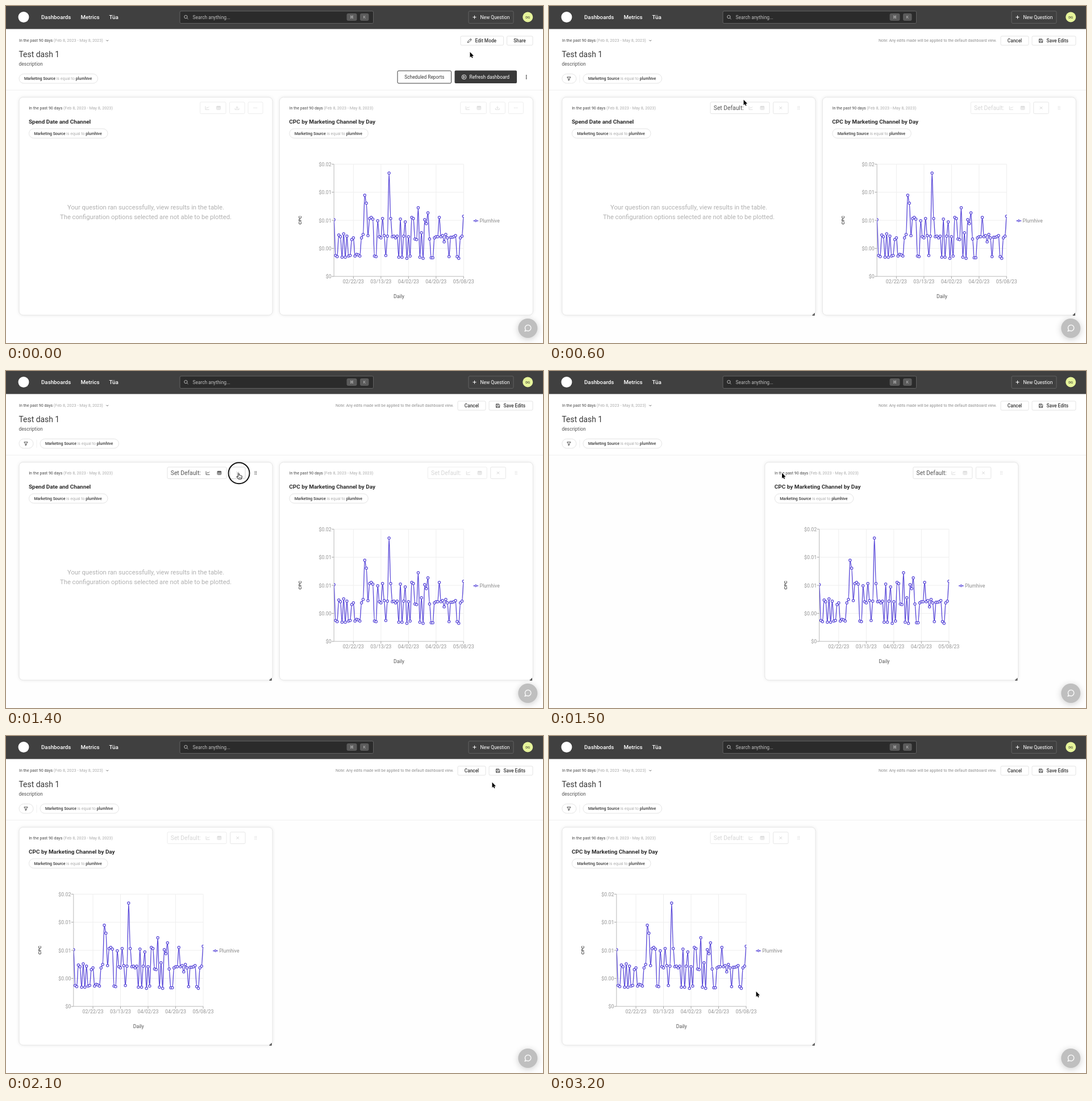
Write an HTML page with a canvas that moves like this. It is 945 px wide and 593 px high and loops after 3.3 s.

```html
<!DOCTYPE html>
<html lang="en">
<head>
<meta charset="utf-8">
<title>Dashboard editing</title>
<style>
html, body { margin: 0; width: 100%; height: 100%; overflow: hidden; background: #fff; }
canvas { display: block; width: 945px; height: 593px; }
</style>
</head>
<body>
<canvas id="stage"></canvas>
<script>
const canvas = document.getElementById('stage');
const ctx = canvas.getContext('2d');
const W = 945, H = 593, LOOP = 3300, STEP = 100;
const ratio = window.devicePixelRatio || 1;
canvas.width = W * ratio;
canvas.height = H * ratio;

const INK = '#383838', MUTED = '#ababab', LINE = '#e4e4e4', PURPLE = '#5847d8';
const SOURCE = 'plumhive';

// CPC per day, as heights on the stage
const daily = [
  376, 439, 441, 403, 406, 442, 401, 442, 405, 440, 439, 411, 408, 440, 437, 438, 440,
  408, 402, 333, 347, 404, 374, 372, 375, 440, 441, 378, 406, 408, 374, 404, 439, 405,
  294, 374, 406, 405, 408, 405, 442, 375, 442, 405, 380, 444, 406, 440, 372, 374, 410,
  411, 355, 442, 399, 444, 376, 383, 364, 410, 443, 443, 408, 406, 406, 372, 406, 404,
  415, 402, 408, 441, 407, 407, 406, 404, 441, 444, 408, 405, 370
];

// Pointer stops: step, x, y
const stops = [
  [0, 816.5, 81], [1, 838, 60], [3, 838, 60], [5, 440, 152], [6, 342.5, 165],
  [9, 395, 176], [12, 410, 179.5], [18, 410, 179.5], [19, 440, 172], [20, 864, 66],
  [21, 855.5, 81.5], [24, 824, 377], [28, 824, 377], [29, 770, 500], [30, 650, 564],
  [31, 480, 530], [32, 364.5, 449.5]
];

function text(str, x, y, size, color = INK, { weight = 400, align = 'left', family = 'Roboto' } = {}) {
  ctx.font = `${weight} ${size}px ${family}, sans-serif`;
  ctx.textAlign = align;
  ctx.fillStyle = color;
  ctx.fillText(str, x, y + size * 0.355);
  return x + ctx.measureText(str).width;
}

function box(x, y, w, h, r, fill, border, width = 1) {
  ctx.beginPath();
  ctx.roundRect(x, y, w, h, r);
  if (fill) { ctx.fillStyle = fill; ctx.fill(); }
  if (border) { ctx.strokeStyle = border; ctx.lineWidth = width; ctx.stroke(); }
}

function circle(x, y, r, fill, border, width = 1) {
  ctx.beginPath();
  ctx.arc(x, y, r, 0, Math.PI * 2);
  if (fill) { ctx.fillStyle = fill; ctx.fill(); }
  if (border) { ctx.strokeStyle = border; ctx.lineWidth = width; ctx.stroke(); }
}

function trace(points, color, width = 1, closed = false) {
  ctx.beginPath();
  points.forEach(([x, y]) => ctx.lineTo(x, y));
  if (closed) ctx.closePath();
  ctx.strokeStyle = color;
  ctx.lineWidth = width;
  ctx.stroke();
}

function fillPath(points, color) {
  ctx.beginPath();
  points.forEach(([x, y]) => ctx.lineTo(x, y));
  ctx.closePath();
  ctx.fillStyle = color;
  ctx.fill();
}

function at(x, y, draw) {
  ctx.save();
  ctx.translate(x, y);
  draw();
  ctx.restore();
}

const icons = {
  chart(c) {
    trace([[-3, -3], [-3, 3], [3.5, 3]], c, 0.9);
    trace([[-1.5, 1], [0, -1], [1.2, 0], [3.2, -2]], c, 0.9);
  },
  table(c) {
    box(-3.3, -3, 6.6, 6, 0.7, null, c, 0.9);
    trace([[-3.3, -1.8], [3.3, -1.8]], c, 1.5);
    trace([[-3.3, 0.6], [3.3, 0.6]], c, 0.8);
    trace([[-1, -3], [-1, 3]], c, 0.7);
    trace([[1.2, -3], [1.2, 3]], c, 0.7);
  },
  download(c) {
    trace([[-3.4, 0.5], [-3.4, 3], [3.4, 3], [3.4, 0.5]], c, 0.9);
    trace([[0, -3.2], [0, 1]], c, 0.9);
    trace([[-1.8, -0.8], [0, 1], [1.8, -0.8]], c, 0.9);
  },
  more(c) { [-2.4, 0, 2.4].forEach(x => circle(x, 0, 0.7, c)); },
  cross(c) {
    trace([[-2.2, -2.2], [2.2, 2.2]], c, 0.9);
    trace([[2.2, -2.2], [-2.2, 2.2]], c, 0.9);
  },
  grip(c) {
    for (const x of [-1.2, 1.2]) for (const y of [-2.4, 0, 2.4]) circle(x, y, 0.75, c);
  },
  plus(c) {
    trace([[-3, 0], [3, 0]], c, 1);
    trace([[0, -3], [0, 3]], c, 1);
  },
  search(c) {
    circle(-0.6, -0.6, 2.7, null, c, 0.9);
    trace([[1.4, 1.4], [3.5, 3.5]], c, 0.9);
  },
  pencil(c) {
    trace([[-3.5, 3.5], [-2.7, 0.9], [1.9, -3.6], [3.5, -2], [-1, 2.7]], c, 0.9, true);
    trace([[0.8, -2.5], [2.4, -0.9]], c, 0.9);
  },
  play(c) {
    circle(0, 0, 3.9, null, c, 0.9);
    trace([[-1.2, -1.8], [1.8, 0], [-1.2, 1.8]], c, 0.9, true);
  },
  save(c) {
    trace([[-3, -3], [1.8, -3], [3.2, -1.6], [3.2, 3.2], [-3, 3.2]], c, 0.9, true);
    trace([[-1.5, -3], [-1.5, -1], [1.2, -1], [1.2, -3]], c, 0.8);
    trace([[-1.7, 3], [-1.7, 1], [1.9, 1], [1.9, 3]], c, 0.8);
  },
  funnel(c) {
    trace([[-3.2, -2.8], [3.2, -2.8], [0.9, 0.2], [0.9, 2.4], [-0.9, 3.2], [-0.9, 0.2]], c, 0.9, true);
  }
};
const icon = (name, x, y, color) => at(x, y, () => icons[name](color));

function dateRange(x, y) {
  const end = text('In the past 90 days ', x, y, 7.05, '#4a4a4a');
  return text('(Feb 8, 2023 - May 8, 2023)', end, y, 7.25, MUTED);
}

function chip(x, y) {
  box(x, y, 138.5, 16.5, 8.25, '#fff', LINE);
  const mid = y + 8.2;
  let end = text('Marketing Source ', x + 9, mid, 6.95, INK, { weight: 500 });
  end = text('is equal to ', end, mid, 7.1, MUTED);
  text(SOURCE, end, mid, 6.95, INK, { weight: 500 });
}

function header() {
  ctx.fillStyle = '#404040';
  ctx.fillRect(0, 0, W, 40.5);
  circle(31, 19.5, 9.5, '#fff');
  const nav = { weight: 500 };
  text('Dashboards', 62, 20, 9.75, '#fff', nav);
  text('Metrics', 131.5, 20, 9.75, '#fff', nav);
  text('Tüa', 181.5, 20, 9.75, '#fff', nav);

  box(306, 9, 340.5, 21.5, 2, '#2b2b2b', '#626262');
  icon('search', 317, 19.7, '#c8c8c8');
  text('Search anything...', 328.5, 20, 8.35, '#bdbdbd');
  box(599.5, 13, 18, 13, 3, '#5b5b5b');
  box(623, 13, 15.5, 13, 3, '#5b5b5b');
  text('⌘', 608.5, 19.6, 7, '#c4c4c4', { align: 'center', family: '"DejaVu Sans"' });
  text('K', 630.7, 19.7, 6.5, '#c4c4c4', { align: 'center' });

  box(814, 9, 79, 21.5, 2, null, '#606060');
  icon('plus', 824.5, 19.7, '#fff');
  text('New Question', 834.5, 20, 8.35, '#fff');
  circle(918.2, 19.5, 9, '#e6f49b');
  text('DG', 918.2, 19.6, 6, '#4a4a3a', { align: 'center', weight: 500 });
}

function subheader(editing) {
  dateRange(23, 60.5);
  trace([[176.3, 59.8], [178.2, 61.7], [180.1, 59.8]], '#555', 0.9);
  text('Test dash 1', 22.5, 85.5, 13.9);
  text('description', 22.5, 101.8, 8.5, '#555');
  ctx.fillStyle = '#efefef';
  ctx.fillRect(0, 147.5, W, 1);
  const label = { weight: 500 };

  if (editing) {
    text('Note: Any edits made will be applied to the default dashboard view.', 580, 61, 7, '#8f8f8f');
    box(795, 53, 49, 16, 2, '#fff', LINE);
    text('Cancel', 819.5, 61, 8.3, INK, { ...label, align: 'center' });
    box(850, 53, 77, 16, 2, '#fff', LINE);
    icon('save', 865.5, 61, INK);
    text('Save Edits', 875.5, 61, 8.3, INK, label);
    box(23, 119.5, 25, 16.5, 8.25, '#fff', LINE);
    icon('funnel', 35, 127.8, INK);
    ctx.fillStyle = '#f1f1f1';
    ctx.fillRect(53.5, 121, 1, 14);
    chip(60, 119.5);
    return;
  }
  box(800, 53, 75.5, 16, 2, '#fff', LINE);
  icon('pencil', 815.8, 61, INK);
  text('Edit Mode', 825.5, 61, 8.35, INK, label);
  box(881.5, 53, 45.5, 16, 2, '#fff', LINE);
  text('Share', 904, 61, 8.35, INK, { ...label, align: 'center' });
  box(689, 114, 94.5, 22, 2, '#fff', '#3c3c3c');
  text('Scheduled Reports', 736.3, 125.2, 8.4, INK, { align: 'center' });
  box(789.5, 113.5, 109.5, 22.5, 2, '#3a3a3a');
  icon('play', 806, 125, '#fff');
  text('Refresh dashboard', 815.5, 125.2, 8.4, '#fff');
  [-2.8, 0, 2.8].forEach(dy => circle(915.7, 125 + dy, 0.95, INK));
  chip(23, 119.5);
}

// Card tools; hover 0 = idle, 1 = label lit, 2 = all lit
function tools(editing, hover, armed) {
  const idle = '#dadada', y = 179.3;
  if (!editing) {
    box(341.5, 169, 45.5, 20.5, 2, null, '#ededed');
    box(393.5, 169, 26.5, 20.5, 2, null, '#ededed');
    box(426, 169, 26, 20.5, 2, null, '#ededed');
    icon('chart', 354, y, idle);
    icon('table', 374, y, idle);
    icon('download', 406.5, y, idle);
    icon('more', 438.7, y, idle);
    return;
  }
  const lit = hover > 1 ? '#4a4a4a' : idle;
  box(284, 169, 104, 20.5, 2, null, hover ? '#e4e4e4' : '#ededed');
  box(394.5, 169, 26.5, 20.5, 2, null, armed ? '#c4c4c4' : '#e6e6e6');
  text('Set Default:', 289.8, 179.8, 10.3, hover ? '#555' : '#d6d6d6');
  icon('chart', 355, y, lit);
  icon('table', 375.3, y, lit);
  icon('cross', 407.7, y, hover > 1 ? '#999' : '#d0d0d0');
  icon('grip', 439.3, y, lit);
}

function card(x, title, body, editing, hover, armed) {
  at(x, 0, () => {
    ctx.save();
    ctx.shadowColor = 'rgba(0,0,0,0.09)';
    ctx.shadowBlur = 6 * ratio;
    box(23, 160.5, 446, 383.5, 7, '#fff');
    ctx.restore();
    box(23, 160.5, 446, 383.5, 7, '#fff', '#e5e5e5');
    dateRange(40.2, 179.5);
    text(title, 40, 203.5, 9.95, '#2c2c2c', { weight: 700 });
    chip(40.5, 216);
    tools(editing, hover, armed);
    body();
    if (editing) {
      trace([[467, 540.5], [467, 544], [463.5, 544]], '#444', 1.3);
      fillPath([[467, 540.5], [467, 544], [463.5, 544]], '#555');
    }
  });
}

function emptyBody() {
  const centered = { align: 'center' };
  text('Your question ran successfully, view results in the table.', 246, 354.5, 11.2, '#b0b0b0', centered);
  text('The configuration options selected are not able to be plotted.', 246, 371.2, 11.2, '#b0b0b0', centered);
}

function chartBody() {
  const left = 118.8, right = 347, bottom = 475.8, gap = (right - left) / (daily.length - 1);
  const px = i => left + i * gap;
  const axis = '#949494';
  ['$0.02', '$0.01', '$0.01', '$0.00', '$0'].forEach((label, i) => {
    const y = 278.3 + i * 49.4;
    if (i < 4) trace([[left, y], [right, y]], '#eeeeee', 1);
    trace([[left - 4, y], [left, y]], '#a5a5a5', 1);
    text(label, left - 4.5, y + 0.3, 8.75, axis, { align: 'right' });
  });
  ['02/22/23', '03/13/23', '04/02/23', '04/20/23', '05/08/23'].forEach((label, i) => {
    const x = px(12 + 17 * i);
    trace([[x, 278.3], [x, bottom]], '#eeeeee', 1);
    trace([[x, bottom], [x, bottom + 4]], '#a5a5a5', 1);
    text(label, x, 484.5, 8.8, axis, { align: 'center' });
  });
  trace([[left, 278.3], [left, bottom], [right, bottom]], '#b9b9b9', 1);
  text('Daily', 233.2, 511, 8.7, '#555', { align: 'center' });
  at(59.3, 376.8, () => {
    ctx.rotate(-Math.PI / 2);
    text('CPC', 0, 0, 7.9, '#333', { align: 'center', weight: 500 });
  });

  ctx.save();
  ctx.beginPath();
  ctx.rect(left, 270, right - left + 0.4, 210);
  ctx.clip();
  ctx.beginPath();
  ctx.moveTo(left, daily[0]);
  for (let i = 1; i < daily.length; i++) {
    ctx.bezierCurveTo(px(i - 1 + 1 / 3), daily[i - 1], px(i - 1 / 3), daily[i], px(i), daily[i]);
  }
  ctx.strokeStyle = PURPLE;
  ctx.lineWidth = 1.35;
  ctx.stroke();
  daily.forEach((y, i) => circle(px(i), y, 2.1, '#fff', PURPLE, 1.2));
  ctx.restore();

  trace([[364, 378], [373, 378]], PURPLE, 1.3);
  circle(368.4, 378, 1.6, '#fff', PURPLE, 1.1);
  text(SOURCE[0].toUpperCase() + SOURCE.slice(1), 375.2, 378.3, 8.6, '#8a8a8a');
}

function chatButton() {
  ctx.save();
  ctx.shadowColor = 'rgba(0,0,0,0.2)';
  ctx.shadowBlur = 12 * ratio;
  ctx.shadowOffsetY = 2 * ratio;
  circle(918.3, 567, 17, '#bfbfbf');
  ctx.restore();
  ctx.beginPath();
  ctx.arc(918.6, 566.5, 5.2, Math.PI * 0.8, Math.PI * 2.63);
  ctx.lineTo(913.2, 572);
  ctx.closePath();
  ctx.strokeStyle = '#fff';
  ctx.lineWidth = 1.3;
  ctx.stroke();
}

function pointerAt(step) {
  const next = stops.findIndex(s => s[0] >= step);
  const b = stops[next], a = stops[Math.max(0, next - 1)];
  const k = b === a ? 0 : (step - a[0]) / (b[0] - a[0]);
  return [a[1] + (b[1] - a[1]) * k, a[2] + (b[2] - a[2]) * k];
}

function arrow() {
  const shape = [[0, 0], [0, 9.4], [2.1, 7.5], [3.5, 10.6], [5, 9.9], [3.7, 6.9], [6.5, 6.8]];
  trace(shape, '#fff', 1.6, true);
  fillPath(shape, '#000');
}

function hand() {
  ctx.beginPath();
  ctx.moveTo(-1.6, 6);
  ctx.lineTo(-1.6, 1);
  ctx.quadraticCurveTo(-0.6, -0.6, 0.4, 1);
  ctx.lineTo(0.4, 4);
  ctx.quadraticCurveTo(1.6, 3.2, 2.2, 4.3);
  ctx.quadraticCurveTo(3.4, 3.7, 3.9, 4.8);
  ctx.quadraticCurveTo(5.4, 4.6, 5.3, 6);
  ctx.quadraticCurveTo(5.3, 8.6, 4.2, 10.6);
  ctx.lineTo(-1, 10.6);
  ctx.quadraticCurveTo(-2.4, 8.7, -4.3, 6.5);
  ctx.quadraticCurveTo(-3.7, 5, -1.6, 6.8);
  ctx.closePath();
  ctx.fillStyle = '#fff';
  ctx.fill();
  ctx.strokeStyle = '#111';
  ctx.lineWidth = 1;
  ctx.stroke();
  for (const x of [0.2, 1.7, 3.2]) trace([[x, 7], [x, 9]], '#111', 0.6);
}

function pointer(step) {
  const [x, y] = pointerAt(step);
  const within = (from, to) => step >= from && step <= to;
  const clicking = step === 2 || step === 14;
  const overButton = within(1, 2) || within(10, 14) || within(16, 18);
  if (clicking) circle(x, y + 0.3, 18.5, 'rgba(255,255,255,0.25)', '#111', 1.9);
  at(x, y, overButton ? hand : arrow);
}

function render(time) {
  const step = Math.floor((time % LOOP) / STEP);
  const editing = step >= 3, removed = step >= 15;
  ctx.setTransform(ratio, 0, 0, ratio, 0, 0);
  ctx.fillStyle = '#fff';
  ctx.fillRect(0, 0, W, H);
  ctx.fillStyle = '#fefefe';
  ctx.fillRect(0, 148, W, H - 148);
  header();
  subheader(editing);

  if (!removed) {
    const hover = step < 6 ? 0 : step === 6 ? 1 : 2;
    card(0, 'Spend Date and Channel', emptyBody, editing, hover, step >= 10);
  }
  const shift = !removed ? 458.3 : step === 15 ? 356.8 : 0;
  const hover = step === 15 ? 1 : step >= 16 && step <= 19 ? 2 : 0;
  card(shift, 'CPC by Marketing Channel by Day', chartBody, editing, hover, step >= 16 && step <= 18);
  chatButton();
  pointer(step);
}

const start = performance.now();
function tick() {
  render(performance.now() - start);
  requestAnimationFrame(tick);
}
tick();
</script>
</body>
</html>
```
